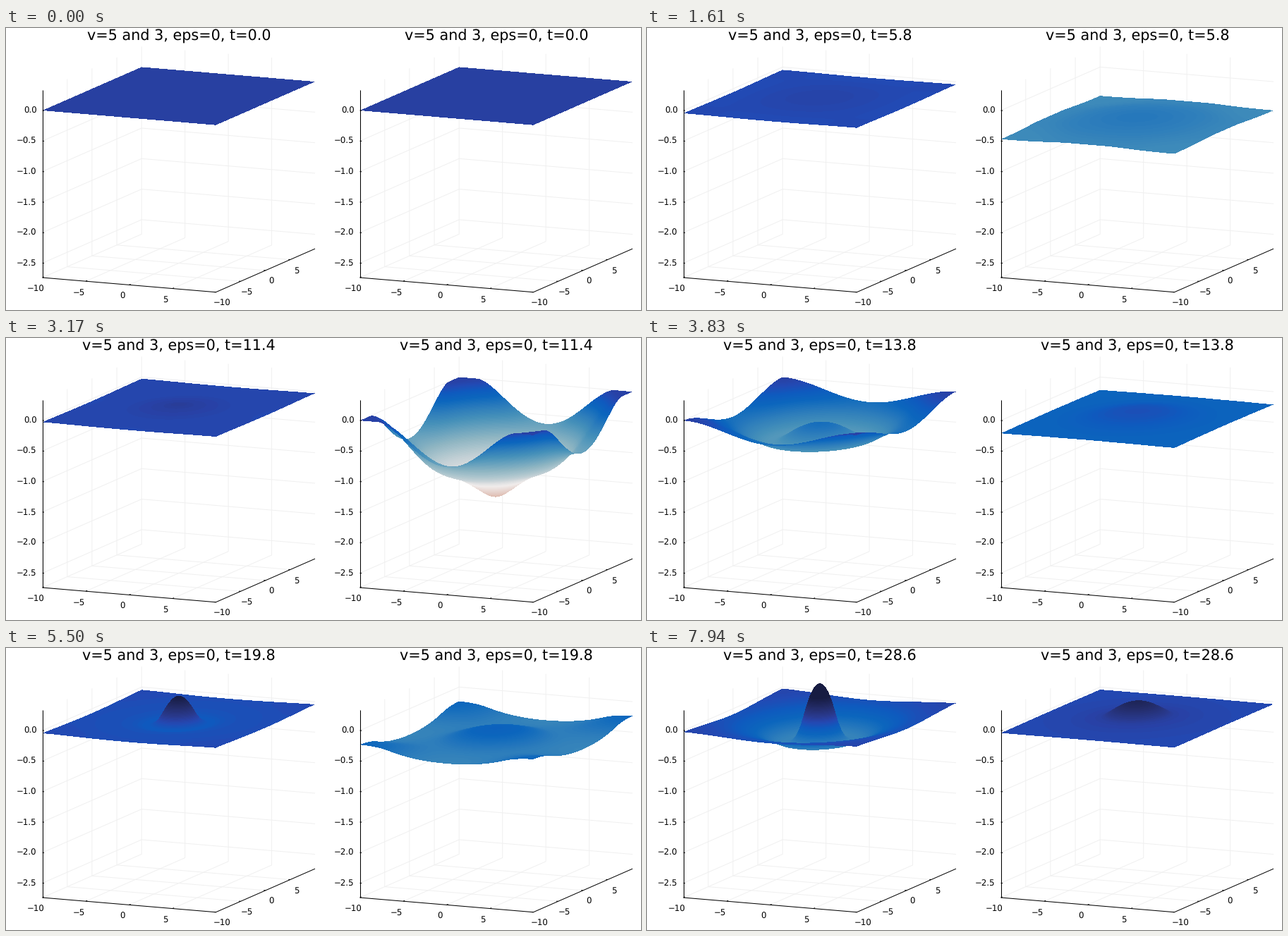
Animation, 900 px wide and 400 px high, one loop 8000 ms. Source, as a matplotlib script:

```python
import numpy as np
import matplotlib.pyplot as plt
from matplotlib.animation import FuncAnimation
from matplotlib.colors import LinearSegmentedColormap

W, H, DPI = 900, 400, 100
STATES, LOOP_MS = 144, 8000
STATE_DT = 0.2
TICKS = 2 * STATES  # two ticks per state, so a change can fall on a half step

# Neural field: dV/dt = I - V + K * H(V - threshold), with signal speed v
SIZE, N = 20.0, 128
STEP = 0.05
THRESHOLD = 0.005

# Orthographic view: pixel position of the corner (-10, -10, 0) and axis vectors
OX, OY = 51.6, 117.0
AX, AY = (245.8, 20.7), (140.6, -61.6)
Z_PX = 86.6
Z_MIN, Z_MAX = -2.737, 0.335
DEPTH = 140

STOPS = [
    (0, 23, 28, 66), (.0455, 35, 43, 102), (.0909, 41, 58, 143),
    (.109, 40, 65, 165), (.125, 34, 74, 180), (.15, 14, 90, 190),
    (.1818, 11, 102, 189), (.2273, 44, 124, 187), (.2727, 69, 144, 185),
    (.3636, 142, 181, 194), (.4545, 210, 216, 219), (.5, 240, 236, 235),
    (.5455, 230, 210, 204), (.6364, 213, 157, 137), (.7273, 196, 101, 72),
    (.8182, 172, 43, 36), (.9091, 120, 14, 40), (1, 60, 9, 17),
]
cmap = LinearSegmentedColormap.from_list(
    "depth", [(s[0], tuple(c / 255 for c in s[1:])) for s in STOPS])
LUT = (cmap(np.linspace(0, 1, 256)) * 255).round().astype(np.uint8)


def simulate(speed):
    """Return the field at every state, using one kernel ring per delay step."""
    dx = SIZE / N
    x = -SIZE / 2 + dx * np.arange(N)
    r = np.hypot(x[:, None], x[None, :])
    kernel = (2 / np.pi * np.exp(-r) - 7 / (9 * np.pi) * np.exp(-r / 3)) * dx * dx
    drive = 5 / (32 * np.pi) * np.exp(-r ** 2 / 32)
    ring = np.floor(r / (speed * STEP)).astype(int)
    count = ring.max() + 1
    spectra = np.array([
        np.fft.rfft2(np.fft.ifftshift(np.where(ring == i, kernel, 0))).real
        for i in range(count)])
    # Reversed and doubled so that any rotation is a plain slice
    spectra = np.tile(spectra[-np.arange(count) % count], (2, 1, 1))
    past = np.zeros((count, N, N // 2 + 1))
    # Sign pattern that centres the field, which makes its spectrum real
    shift = (-1.0) ** np.add.outer(np.arange(N), np.arange(N // 2 + 1))

    v = np.zeros((N, N))
    per_state = round(STATE_DT / STEP)
    fields = []
    for s in range(STATES * per_state):
        if s % per_state == 0:
            fields.append(np.pad(v, (0, 1), mode="wrap"))
        past[s % count] = np.fft.rfft2(v > THRESHOLD).real * shift
        a = -s % count
        total = np.einsum("kij,kij->ij", spectra[a:a + count], past)
        v = v + STEP * (drive - v + np.fft.irfft2(total * shift, s=(N, N)))
    return fields


class Surface:
    """Height field drawn column by column, from the back to the front."""

    def __init__(self):
        self.left = int(OX)
        self.cols = round(AX[0] + AY[0]) + 1
        d = self.left + np.arange(self.cols) + 0.5 - OX
        near = np.clip((d - AX[0]) / AY[0], 0, 1)
        far = np.clip(d / AY[0], 0, 1)
        k = np.linspace(0, 1, DEPTH)[:, None]
        fy = far + (near - far) * k
        fx = np.clip((d - AY[0] * fy) / AX[0], 0, 1)
        self.base = OY + AX[1] * fx + AY[1] * fy
        gx, gy = fx * N, fy * N
        ix = np.minimum(gx.astype(int), N - 1)
        iy = np.minimum(gy.astype(int), N - 1)
        self.corner = iy * (N + 1) + ix
        self.wx, self.wy = gx - ix, gy - iy
        self.col = np.broadcast_to(np.arange(self.cols), (DEPTH - 1, self.cols)).ravel()

    def sample(self, field):
        f, c, row = field.ravel(), self.corner, N + 1
        top = f[c] + self.wx * (f[c + 1] - f[c])
        low = f[c + row] + self.wx * (f[c + row + 1] - f[c + row])
        return top + self.wy * (low - top)

    def paint(self, img, field, offset):
        z = self.sample(field)
        y = self.base - Z_PX * z
        y0, y1 = y[:-1].ravel(), y[1:].ravel()
        z0, z1 = z[:-1].ravel(), z[1:].ravel()
        first = np.ceil(np.minimum(y0, y1) - 0.5).astype(int)
        n = np.ceil(np.maximum(y0, y1) - 0.5).astype(int) - first
        seg = np.repeat(np.arange(n.size), n)
        row = first[seg] + np.arange(seg.size) - np.repeat(np.cumsum(n) - n, n)
        t = (row + 0.5 - y0[seg]) / (y1[seg] - y0[seg])
        value = z0[seg] + t * (z1[seg] - z0[seg])
        shade = np.clip((Z_MAX - value) / (Z_MAX - Z_MIN) * 256, 0, 255).astype(int)
        img[np.clip(row, 0, H - 1), self.col[seg] + self.left + offset] = LUT[shade]


def project(x, y, z):
    fx, fy = (x + 10) / SIZE, (y + 10) / SIZE
    return (OX + AX[0] * fx + AY[0] * fy,
            OY + AX[1] * fx + AY[1] * fy - Z_PX * z)


plt.rcParams["font.family"] = "DejaVu Sans"
plt.rcParams["text.hinting"] = "none"
fig = plt.figure(figsize=(W / DPI, H / DPI), dpi=DPI, facecolor="white")
ax = fig.add_axes([0, 0, 1, 1])
ax.axis("off")


def line(points, offset, color, z):
    px, py = zip(*(project(*p) for p in points))
    ax.plot(np.array(px) + offset, py, color=color, lw=0.72, zorder=z,
            solid_capstyle="butt")


def label(x, y, text, ha="center"):
    ax.text(x, y + 4, text.replace("-", "\u2212"), fontsize=11.8 * 0.72, ha=ha,
            va="baseline", zorder=4)


def draw_axes(offset):
    grid = "#f0f0f0"
    for t in (-10, -5, 0, 5):
        line([(t, -10, Z_MIN), (t, 10, Z_MIN), (t, 10, Z_MAX)], offset, grid, 1)
        line([(10, t, Z_MIN), (-10, t, Z_MIN), (-10, t, Z_MAX)], offset, grid, 1)
        line([(t, -10, Z_MIN), (t, -9.7, Z_MIN)], offset, "black", 3)
        line([(10, t, Z_MIN), (9.8, t, Z_MIN)], offset, "black", 3)
        x, y = project(t, -10, Z_MIN)
        label(x + offset - 9.7, y + 15.5, str(t))
        x, y = project(10, t, Z_MIN)
        label(x + offset + 8.5, y + 15, str(t))
    for z in np.arange(0, -2.6, -0.5):
        line([(-10, -10, z), (-10, 10, z), (10, 10, z)], offset, grid, 1)
        line([(-10, -10, z), (-9.8, -10, z)], offset, "black", 3)
        label(offset + 43.5, project(-10, -10, z)[1], f"{z:.1f}", "right")
    line([(-10, -10, Z_MAX), (-10, -10, Z_MIN)], offset, "black", 3)
    line([(-10, -10, Z_MIN), (10, -10, Z_MIN), (10, 10, Z_MIN)], offset, "black", 3)


panels = [(0, simulate(5.0)), (450, simulate(3.0))]
surface = Surface()
canvas = np.zeros((H, W, 4), np.uint8)
image = ax.imshow(canvas, extent=(0, W, H, 0), interpolation="nearest",
                  aspect="auto", zorder=2)
titles = []
for offset, _ in panels:
    draw_axes(offset)
    titles.append(ax.text(offset + 245.3, 18, "", fontsize=20.8 * 0.72,
                          ha="center", va="baseline", zorder=4))
ax.set_xlim(0, W)
ax.set_ylim(H, 0)


def update(tick):
    k = min((tick + 1) // 2, STATES - 1)
    canvas[:] = 0
    for (offset, fields), title in zip(panels, titles):
        surface.paint(canvas, fields[k], offset)
        title.set_text(f"v=5 and 3, eps=0, t={k * STATE_DT:.1f}")
    image.set_data(canvas)
    return [image, *titles]


anim = FuncAnimation(fig, update, frames=TICKS, interval=LOOP_MS / TICKS,
                     repeat=True, repeat_delay=0, blit=False)
plt.show()
```
